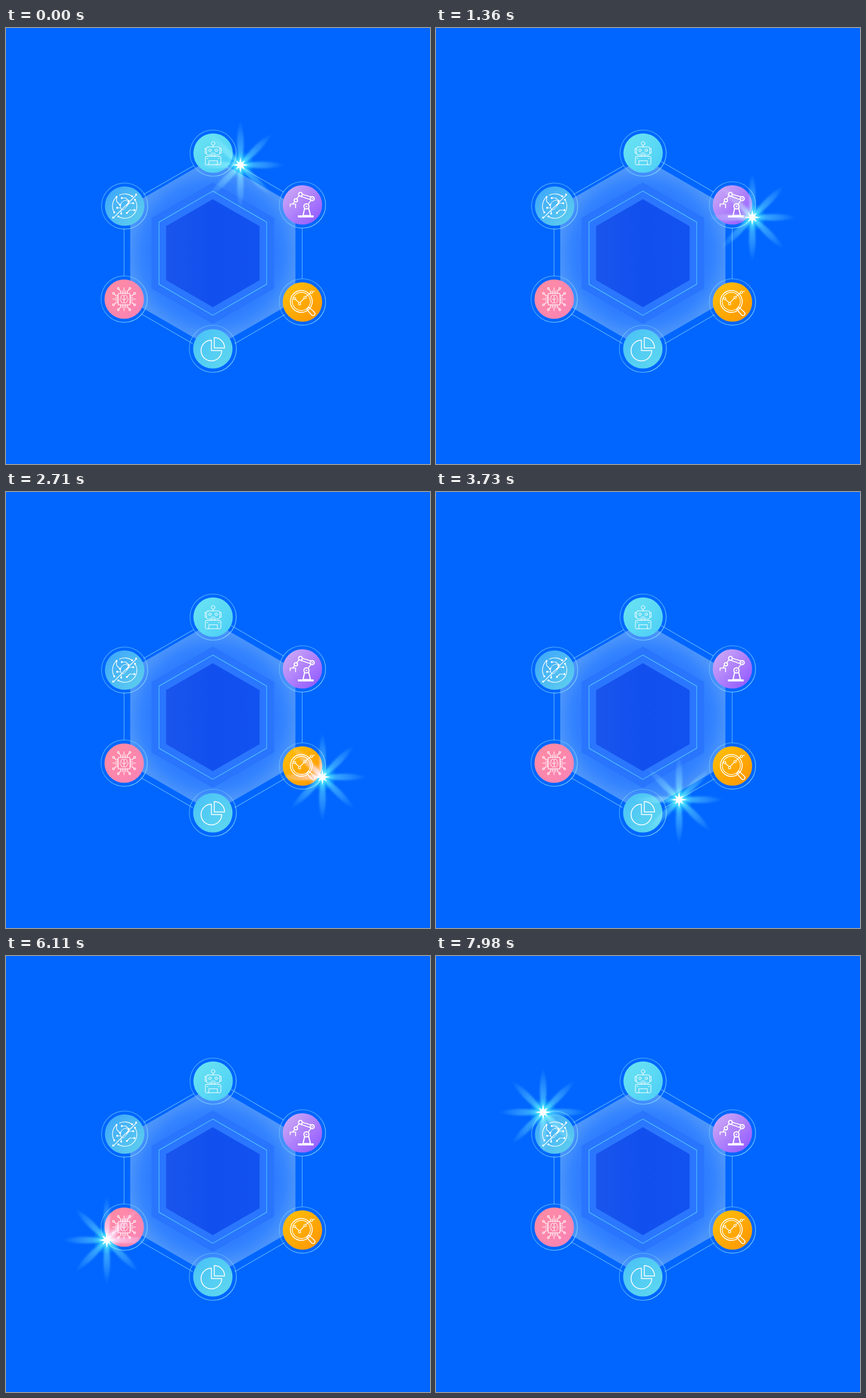
Write an HTML page that moves like this. It is 738 px wide and 759 px high and loops after 8 s.

```html
<!DOCTYPE html>
<html lang="en">
<head>
<meta charset="utf-8">
<title>Hexagon of services</title>
<style>
  html, body { margin: 0; width: 100%; height: 100%; overflow: hidden; background: #06f; }
  svg { display: block; width: 100%; height: 100%; }
  .icon { fill: none; stroke: #fff; stroke-width: 1.2; stroke-linecap: round; stroke-linejoin: round; }
  .solid { fill: #fff; stroke: none; }
  #flare { mix-blend-mode: screen; }
</style>
</head>
<body>
<svg viewBox="0 0 738 759" preserveAspectRatio="none">
  <defs>
    <radialGradient id="halo" gradientUnits="userSpaceOnUse" cx="360" cy="392" r="166">
      <stop offset=".6" stop-color="#2a7aff"/>
      <stop offset=".74" stop-color="#3483ff"/>
      <stop offset=".88" stop-color="#4a94fb"/>
      <stop offset="1" stop-color="#5b97ee"/>
    </radialGradient>
    <linearGradient id="core">
      <stop offset="0" stop-color="#1a55ec"/>
      <stop offset=".5" stop-color="#1150ee"/>
      <stop offset="1" stop-color="#1252f0"/>
    </linearGradient>
    <linearGradient id="rim" x2="1" y2="1">
      <stop offset="0" stop-color="#7fd0ff" stop-opacity=".75"/>
      <stop offset=".35" stop-color="#7fd0ff" stop-opacity=".5"/>
      <stop offset="1" stop-color="#8fe0ff" stop-opacity=".95"/>
    </linearGradient>
    <linearGradient id="ray" gradientUnits="userSpaceOnUse" x1="0" y1="0" x2="0" y2="-78">
      <stop offset="0" stop-color="#6ef"/>
      <stop offset=".25" stop-color="#5bf" stop-opacity=".62"/>
      <stop offset=".6" stop-color="#6af" stop-opacity=".36"/>
      <stop offset="1" stop-color="#6af" stop-opacity="0"/>
    </linearGradient>
    <radialGradient id="glow">
      <stop offset="0" stop-color="#4ff"/>
      <stop offset=".45" stop-color="#2df" stop-opacity=".55"/>
      <stop offset="1" stop-color="#2af" stop-opacity="0"/>
    </radialGradient>
    <filter id="soft" x="-50%" y="-20%" width="200%" height="140%"><feGaussianBlur stdDeviation="1.6"/></filter>
  </defs>

  <rect width="738" height="759" fill="#06f"/>
  <g id="hexagons"></g>
  <path d="M239 290L327 239.500M392 232.500L484 286M515.500 348V437M485 499L398 549.500M325 549.500L236 498M205.500 432V349"
        fill="none" stroke="#5fb4ff" stroke-width="1.1"/>
  <g id="discs"></g>

  <!-- robot -->
  <g class="icon" transform="translate(360.500 218)">
    <g stroke-width="1">
      <circle cy="-17" r="3.2"/><path d="M0-13.500V-11M-3 3V5.500M3 3V5.500"/>
      <rect x="-11.500" y="-11" width="23" height="14" rx="2.500"/>
      <path d="M-11.500-8.500H-14V0H-11.500M11.500-8.500H14V0H11.500M-3.500 0H3.500"/>
      <circle cx="-5.500" cy="-5" r="2.200"/><circle cx="5.500" cy="-5" r="2.200"/>
      <rect x="-13.500" y="5.500" width="27" height="14.500" rx="1.500"/>
      <path d="M-7.500 20V13H7.500V20M-11 9H-9M9 9H11"/>
    </g>
  </g>

  <!-- robotic arm -->
  <g class="icon">
    <path d="M508 328H535.500" stroke-width="3.600" stroke-linecap="butt"/>
    <path d="M520 313L517 326.500H530L526.500 313" stroke-width="2"/>
    <path d="M525.500 307L531 300M514 289L531 294M513 293L530 299M510 292L505.500 298M502 302.500L499.500 306M494.500 311V306.500H504V313" stroke-width="1.600"/>
    <g fill="#ad7cfb" stroke-width="2">
      <circle cx="523" cy="310.500" r="4.500"/><circle cx="533" cy="297" r="3.500"/>
      <circle cx="512.500" cy="289.500" r="3.200"/><circle cx="504.500" cy="300" r="2.800"/>
    </g>
    <g class="solid"><circle cx="523" cy="310.500" r="1.500"/><circle cx="533" cy="297" r="1.200"/></g>
  </g>

  <!-- magnifier with chart -->
  <g class="icon">
    <circle cx="514" cy="476" r="19" stroke-width="1.500"/>
    <circle cx="514" cy="476" r="15.800"/>
    <path d="M503.500 472L511 479L519 470.500M522 467.500L530 461M533 459.500L537 458"/>
    <path d="M527.500 486L537 495A3 3 0 0 1 532 499.500L523.500 490Z" stroke-width="1.600"/>
    <g fill="#ffae00"><circle cx="502.500" cy="471" r="1.900"/><circle cx="511" cy="480" r="2"/>
      <circle cx="520.500" cy="469" r="2"/><circle cx="531.500" cy="460" r="2"/></g>
  </g>

  <!-- pie chart -->
  <g class="icon">
    <path stroke-width="1.500" d="M357.500 543.500A18 18 0 1 0 375.500 561.500H357.500ZM362.500 539A18 18 0 0 1 380.500 557H362.500Z"/>
  </g>

  <!-- chip -->
  <g class="icon" transform="translate(205.500 472)">
    <rect x="-10.500" y="-10" width="21" height="20" rx="2.500"/>
    <path d="M0-6C-3-8-6-6-5-3C-8-1-7 3-5 3C-5 6-2 8 0 6C3 8 6 5 5 3C8 2 7-2 5-3C6-6 3-8 0-6V6M-4-1L-1 1M4-1L1 1" stroke-width="1"/>
    <g id="pins" stroke-width="1.100"></g>
  </g>

  <!-- circuit globe -->
  <g class="icon" transform="translate(206.500 310)">
    <path stroke-width="1.100" d="M-15-15A21 21 0 0 0-18 11M-9-19A21 21 0 0 1 13-17M18-11A21 21 0 0 1-11 18M-19 20L20-19M-14-16V-8L-8-2M-5-14H2L7-9M-13 3H-7M15-5H8L4-1M17 7H9L4 12M-6 13V8"/>
    <path d="M-6 5C-10-3-4-9 1-10C7-11 7-4 4 0C0 6-4 9-6 5Z" stroke-width="1"/>
    <g class="solid" id="nodes"></g>
  </g>

  <g id="flare" class="star"><circle r="25" fill="url(#glow)"/></g>
  <path class="star" id="spark" fill="#fff"/>
</svg>

<script>
const $ = id => document.getElementById(id);
const rad = degrees => degrees * Math.PI / 180;
const mix = (a, b, u) => a + (b - a) * u;

function add(parent, tag, attrs) {
  const el = document.createElementNS('http://www.w3.org/2000/svg', tag);
  for (const key in attrs) el.setAttribute(key, attrs[key]);
  return parent.appendChild(el);
}
function onCircle(cx, cy, r, degrees) {
  return [cx + r * Math.cos(rad(degrees)), cy + r * Math.sin(rad(degrees))];
}

// Nested hexagons: radius, fill, stroke
for (const [r, fill, stroke] of [
  [166, 'url(#halo)', 'none'],
  [123, '#2975fd', 'none'],
  [108.2, '#2b76ff', '#55c4ff'],
  [94, 'url(#core)', 'none']
]) {
  const points = [0, 1, 2, 3, 4, 5].map(i => onCircle(360, 392, r, i * 60 - 90));
  add($('hexagons'), 'polygon', { points: points.join(' '), fill, stroke, 'stroke-width': 1.1 });
}

// Discs with their outer rims: centre, rim radius, gradient colours
[
  [360.5, 217.8, 40.2, '#68e2f2', '#4fd0f6'],
  [516, 308, 40.3, '#cba6f6', '#935cff'],
  [516, 477, 40.3, '#ffbd08', '#ff9800'],
  [360, 558.5, 41, '#4cc4f6', '#5cd6f0'],
  [205.7, 472, 40.3, '#ff8aa4', '#fa84b4'],
  [206.5, 310, 40.2, '#3fa8fa', '#5ccdee']
].forEach(([cx, cy, r, from, to], i) => {
  const shade = add(document.querySelector('defs'), 'linearGradient', { id: 'disc' + i, x2: 1, y2: 1 });
  add(shade, 'stop', { offset: .1, 'stop-color': from });
  add(shade, 'stop', { offset: .9, 'stop-color': to });
  add($('discs'), 'circle', { cx, cy, r, fill: 'none', stroke: 'url(#rim)', 'stroke-width': 1.2 });
  add($('discs'), 'circle', { cx, cy, r: 34.3, fill: `url(#disc${i})` });
});

// Chip pins: three per side, the outer ones bent and ending in a small ring
for (let side = 0; side < 4; side++) {
  const group = add($('pins'), 'g', { transform: `rotate(${side * 90})` });
  add(group, 'path', { d: 'M0-10V-20M-3-10V-15M3-10V-15M-6-10V-14L-9-17M6-10V-14L9-17' });
  for (const x of [-10, 10]) add(group, 'circle', { cx: x, cy: -18.5, r: 1.6 });
}
for (const [cx, cy] of [[-20, 20], [20, -20], [-14, -16], [-8, -2], [-5, -14], [7, -9],
  [-13, 3], [15, -5], [17, 7], [4, 12], [-6, 13], [-18, 11], [13, -17], [18, -11], [-11, 18]])
  add($('nodes'), 'circle', { cx, cy, r: 1.7 });

// Flare: eight petals and a small white star
for (let i = 0; i < 8; i++)
  add($('flare'), 'path', {
    d: 'M-2 0C-4-14-10-46 0-78C10-46 4-14 2 0Z', fill: 'url(#ray)',
    filter: 'url(#soft)', transform: `rotate(${i * 45})`
  });
const tips = Array.from({ length: 16 }, (_, i) => onCircle(0, 0, i % 2 ? 5 : i % 4 ? 11 : 14, i * 22.5));
$('spark').setAttribute('d', 'M' + tips.join('L') + 'Z');

// Arcs around the rims: centre, radius, angles, start and end time; straight lines between
const START = [408, 238.5];
const ARCS = [
  [516, 308, 40.7, -146, 90, 405, 1667],
  [516, 477, 39.7, -90, 146, 2050, 3370],
  [360, 558, 41.5, -12, 196, 3870, 4900],
  [206, 472, 38, 41, 270, 5560, 6787],
  [206.5, 310, 43, 90, 243, 7168, 7980]
];
function starAt(t) {
  let from = START, since = 0;
  for (const [cx, cy, r, a0, a1, t0, t1] of ARCS) {
    if (t < t0) {
      const to = onCircle(cx, cy, r, a0), u = (t - since) / (t0 - since);
      return [mix(from[0], to[0], u), mix(from[1], to[1], u)];
    }
    if (t < t1) return onCircle(cx, cy, r, mix(a0, a1, (t - t0) / (t1 - t0)));
    from = onCircle(cx, cy, r, a1);
    since = t1;
  }
  return from;
}

const LOOP = 8000, STEP = 169.7;
const stars = document.querySelectorAll('.star');
function draw() {
  const t = performance.now() % LOOP;
  const [x, y] = starAt(Math.floor((t + 6) / STEP) * STEP);
  for (const el of stars) el.setAttribute('transform', `translate(${x.toFixed(2)} ${y.toFixed(2)})`);
  requestAnimationFrame(draw);
}
draw();
</script>
</body>
</html>
```
